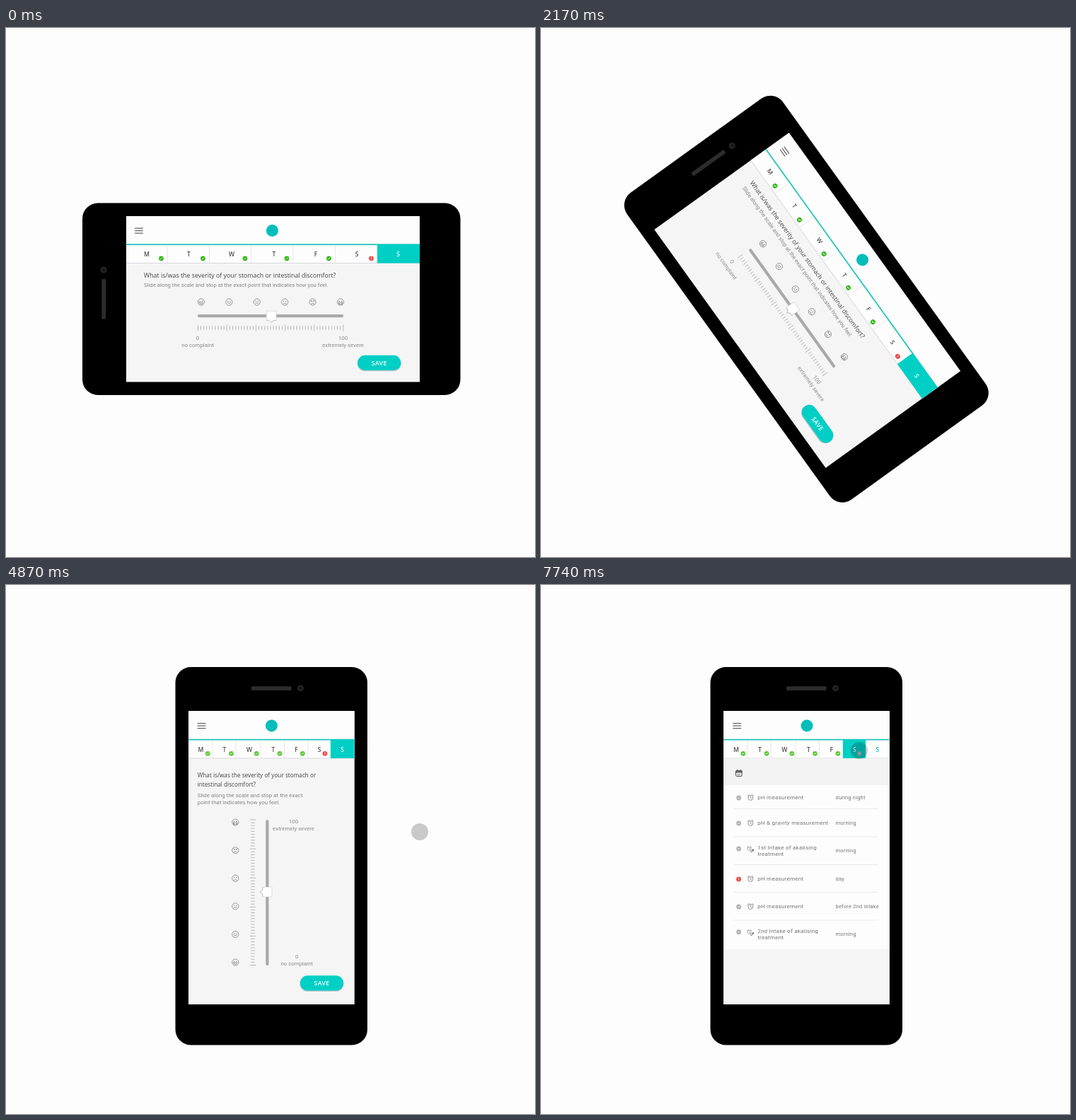
Animation, 748 px wide and 748 px high, one loop 8 s. Source, as an HTML page:

```html
<!DOCTYPE html>
<html lang="en">
<head>
<meta charset="utf-8">
<style>
  html, body { margin: 0; width: 100%; height: 100%; overflow: hidden; background: #fdfdfd; }
  svg { display: block; width: 748px; height: 748px; }
  text { font-family: Roboto, sans-serif; fill: #858585; }
  .ask { font-family: "Open Sans", sans-serif; fill: #444; }
  .day { font: 600 8.6px "Open Sans", sans-serif; fill: #4c4c4c; text-anchor: middle; }
  .save { font: 600 8.8px "Open Sans", sans-serif; fill: #fff; text-anchor: middle; letter-spacing: .35px; }
  .mid { font-size: 7.85px; fill: #8c8c8c; text-anchor: middle; }
  .task { font-size: 8px; letter-spacing: .25px; fill: #747474; }
  .time { font-size: 7.5px; letter-spacing: .2px; fill: #747474; }
  .line { fill: none; stroke-linecap: round; stroke-linejoin: round; }
</style>
</head>
<body>
<svg id="stage" viewBox="0 0 748 748"></svg>
<script>
const TEAL = '#00cfc5', PAPER = '#fdfdfd', BODY = '#f5f5f6', RED = '#ee4646', GREY = '#b0b0b0';
const CX = 375.25, CY = 383.25;

const rect = (x, y, w, h, fill, rx = 0) =>
  `<rect x="${x}" y="${y}" width="${w}" height="${h}" rx="${rx}" fill="${fill}"/>`;
const dot = (x, y, r, fill) => `<circle cx="${x}" cy="${y}" r="${r}" fill="${fill}"/>`;
const line = (d, stroke, width = 1) =>
  `<path class="line" d="${d}" stroke="${stroke}" stroke-width="${width}"/>`;
const text = (x, y, s, cls, size) =>
  `<text x="${x}" y="${y}" class="${cls || ''}"${size ? ` style="font-size:${size}px"` : ''}>${s}</text>`;
const at = (x, y, body) => `<g transform="translate(${x} ${y})">${body}</g>`;
const each = (list, fn) => list.map(fn).join('');

// Status badge: check mark or exclamation mark
const badge = (x, y, fill, alert) => at(x, y, dot(0, 0, 3.4, fill) +
  line(alert ? 'M0-1.7V.3M0 1.6V1.7' : 'M-1.5 0L-.4 1.1L1.6-1', '#fff', .8));

const MOUTHS = ['M-2.6.6H2.6Q2 3 0 3T-2.6.6Z', 'M-2.2 1Q0 3.2 2.2 1', 'M-2 1.6H2',
  'M-2 2.5Q0 .4 2 2.5', 'M-2 2.6Q0 .6 2 2.6M-2.6-2.4L-.8-1.3M2.6-2.4L.8-1.3',
  'M-2 2.7V1.2Q0-.2 2 1.2V2.7ZM-2.7-.3V2.4M2.7-.3V2.4'];
const face = (x, y, mood) => at(x, y,
  `<circle r="4.6" fill="none" stroke="#777" stroke-width=".75"/>` +
  dot(-1.6, -1.1, .65, '#777') + dot(1.6, -1.1, .65, '#777') +
  line(MOUTHS[mood], '#777', .75));

// Top bar with menu, emblem and week tabs
function header(o) {
  const { x, y, w, menu, emblem, days, seps, active, badges, green } = o;
  const edges = [x, ...seps, x + w];
  return rect(x, y, w, 66.5, PAPER) +
    each([17, 20.5, 24], dy => line(`M${menu} ${y + dy}h11`, '#666', 1.25)) +
    dot(emblem, y + 20.5, 8.5, '#03bdba') +
    each(seps, s => line(`M${s} ${y + 42}v24`, '#e3e3e3', .8)) +
    rect(x, y + 66, w, 1, '#d9d9df') +
    rect(x, y + 39.3, w, 1.7, '#1cc3bd') +
    rect(edges[active], y + 40, edges[active + 1] - edges[active], 26.5, TEAL) +
    each(days, (d, i) => `<g${i === active ? ' style="--c:#fff"' : ''}>` +
      `<text class="day" x="${d}" y="${y + 57}" style="fill:${
        i === active ? '#fff' : i === 6 ? '#10bcb5' : '#4c4c4c'}">${'MTWTFSS'[i]}</text></g>`) +
    each(badges, (b, i) => badge(b, y + 59.8,
      i < 5 ? green : active === 5 ? '#7fb9b8' : RED, i === 5));
}

const button = (x, y) => rect(x, y + 1, 61.5, 21.5, '#b9c6c6', 10.75) +
  rect(x, y, 61.5, 21.2, TEAL, 10.6) + text(x + 30.8, y + 13.8, 'SAVE', 'save');

// Scale drawn left to right; turned a quarter for the upright layout
function ticks(x, y, upright) {
  let d = '';
  for (let i = 0; i <= 50; i++) {
    const p = i * 4.11, r = i % 10 ? 2.3 : 4;
    d += upright ? `M${x - r} ${y + p}h${2 * r}` : `M${x + p} ${y - r}v${2 * r}`;
  }
  return line(d, '#a2a2a2', .75);
}

const thumb = (x, y, turn) => `<g transform="translate(${x} ${y}) rotate(${turn})">` +
  `<path d="M-7-6.5H7V6.5H3L0 10L-3 6.5H-7Z" fill="#fff" stroke="#c9c9c9" stroke-width=".6"/>` +
  line('M-6.5 6.8H-3L0 10.2L3 6.8H6.5', '#b3b3b3', .7) + '</g>';

const phone = rect(108, 247.5, 534.5, 271.5, '#000', 22) + dot(138, 342, 4.3, '#2c2c2c') +
  dot(138, 342, 2.6, '#161616') + rect(135.3, 355, 5.8, 56.5, '#2c2c2c', 1) +
  rect(170, 266, 415, 234.5, BODY);

const wide = header({
    x: 170, y: 266, w: 415, menu: 182.5, emblem: 376.5, active: 6, green: '#2eb611',
    days: [199, 258.5, 319, 379, 438, 496, 554.5],
    seps: [228, 287.5, 346.5, 406, 465.5, 525],
    badges: [219.5, 278.5, 338, 397, 456.5, 516.5]
  }) +
  text(195, 352.5, 'What is/was the severity of your stomach or intestinal discomfort?', 'ask', 8.85) +
  text(195, 365.5, 'Slide along the scale and stop at the exact point that indicates how you feel.', '', 7.76) +
  each([0, 1, 2, 3, 4, 5], i => face(276 + i * 39.4, 387.5, i)) +
  rect(271, 405, 206, 4.2, '#a9a9a9', 2) + thumb(375.2, 406.7, 0) + ticks(271.3, 424, false) +
  text(271, 440.5, '0', 'mid') + text(271, 450.5, 'no complaint', 'mid') +
  text(476.5, 440.5, '100', 'mid') + text(476.5, 450.5, 'extremely severe', 'mid') +
  button(497, 462.8);

const week = {
  x: 258, y: 178.5, w: 234.5, menu: 271, emblem: 375.5, active: 6, green: '#5cc736',
  days: [275.5, 309, 344, 378, 410.5, 443, 475.5],
  seps: [292, 325, 360, 393.5, 427, 459],
  badges: [285.3, 318.5, 354.3, 387, 419.3, 451]
};

const tall = rect(258, 178, 234.5, 415, BODY) + header(week) +
  text(270.7, 272, 'What is/was the severity of your stomach or', 'ask', 8.23) +
  text(270.7, 284.5, 'intestinal discomfort?', 'ask', 8.23) +
  text(270.7, 300, 'Slide along the scale and stop at the exact', '', 7.96) +
  text(270.7, 310, 'point that indicates how you feel.', '', 7.96) +
  each([0, 1, 2, 3, 4, 5], i => face(324.3, 533.5 - i * 39.6, i)) +
  ticks(349, 332, true) + rect(367.3, 332, 4.2, 206, '#a9a9a9', 2) + thumb(369.5, 434, 90) +
  text(406.5, 337.2, '100', 'mid') + text(406.5, 346.7, 'extremely severe', 'mid') +
  text(411.3, 527.7, '0', 'mid') + text(411.3, 537.5, 'no complaint', 'mid') +
  button(415.8, 552.3);

const alarm = (x, y, small) => at(x, y, `<g transform="scale(${small ? .75 : 1})">` +
  `<circle r="3.5" cy=".4" fill="none" stroke="#777" stroke-width=".8"/>` +
  line('M0-1.5V.6L1.5 1.6M-4.2-2.4L-2.2-4M4.2-2.4L2.2-4', '#777', .8) + '</g>' +
  (small ? line('M3 4.2L5.4 2', '#777', 2.6) + line('M3.1 4.1L4 3.3', '#fff', 1.1) : ''));

const calendar = at(279.8, 266,
  `<rect x="-4.3" y="-3.6" width="8.6" height="8" rx="1" fill="none" stroke="#4a4a4a"/>` +
  line('M-4-1.8H4', '#4a4a4a', 2) + line('M-2.4-4.8V-3.6M2.4-4.8V-3.6', '#4a4a4a', 1.1) +
  line('M-2.2 1.2H2.4M-2.2 2.8H1', '#777', .7));

const TASKS = [
  [301, 303, 'pH measurement', 'during night'],
  [337, 338.5, 'pH &amp; gravity measurement', 'morning'],
  [373, 378, '1st Intake of akalising', 'morning', true],
  [416, 417.5, 'pH measurement', 'day'],
  [455, 456.5, 'pH measurement', 'before 2nd intake'],
  [490.7, 496, '2nd Intake of akalising', 'morning', true]
];
const list = rect(258, 178, 234.5, 415, BODY) +
  header({ ...week, menu: 271.7, emblem: 376, active: 5,
    days: week.days.map(d => d + .4), badges: week.badges.map((b, i) => b + (i < 5 ? .5 : -1)) }) +
  rect(258, 245, 234.5, 38, '#f3f3f3') + calendar + rect(258, 283, 234.5, 232, PAPER) +
  each([316.5, 356, 395.5, 434.5, 474], y => rect(272, y - .4, 205, .8, '#e8e8e8')) +
  each(TASKS, ([icon, y, name, when, long], i) =>
    badge(279.6, icon, i === 3 ? RED : GREY, i === 3) +
    alarm(long ? 294.5 : 296.3, icon - (long ? .3 : .5), long) +
    text(306.2, long ? y - 4.5 : y, name, 'task') +
    (long ? text(306.2, y + 5, 'treatment', 'task') : '') +
    text(416.5, y, when, 'time'));

const group = (id, body) => `<g id="${id}">${body}</g>`;
document.getElementById('stage').innerHTML = rect(0, 0, 748, 748, PAPER) +
  group('device', phone + group('wide', wide)) + group('tall', tall) + group('list', list) +
  '<circle id="touch" r="12"/>';

const [device, wideEl, tallEl, listEl, touch] =
  ['device', 'wide', 'tall', 'list', 'touch'].map(id => document.getElementById(id));
const progress = (t, from, to) => Math.min(1, Math.max(0, (t - from) / (to - from)));
const show = (el, on) => el.setAttribute('visibility', on ? 'visible' : 'hidden');

function draw(now) {
  const t = now % 8000;
  const turn = progress(t, 1975, 2300);
  device.setAttribute('transform', `rotate(${90 * turn} ${CX} ${CY})`);
  show(wideEl, turn < 1);
  show(tallEl, turn === 1);

  const fade = progress(t, 7010, 7340);
  show(listEl, fade > 0);
  listEl.setAttribute('opacity', fade);

  const move = progress(t, 5640, 6540);
  touch.setAttribute('cx', 585 - 135 * move);
  touch.setAttribute('cy', 349 - 115 * move);
  touch.setAttribute('opacity', .205 * progress(t, 4540, 4870));
}

const start = performance.now();
function tick() {
  draw(performance.now() - start);
  requestAnimationFrame(tick);
}
tick();
</script>
</body>
</html>
```
